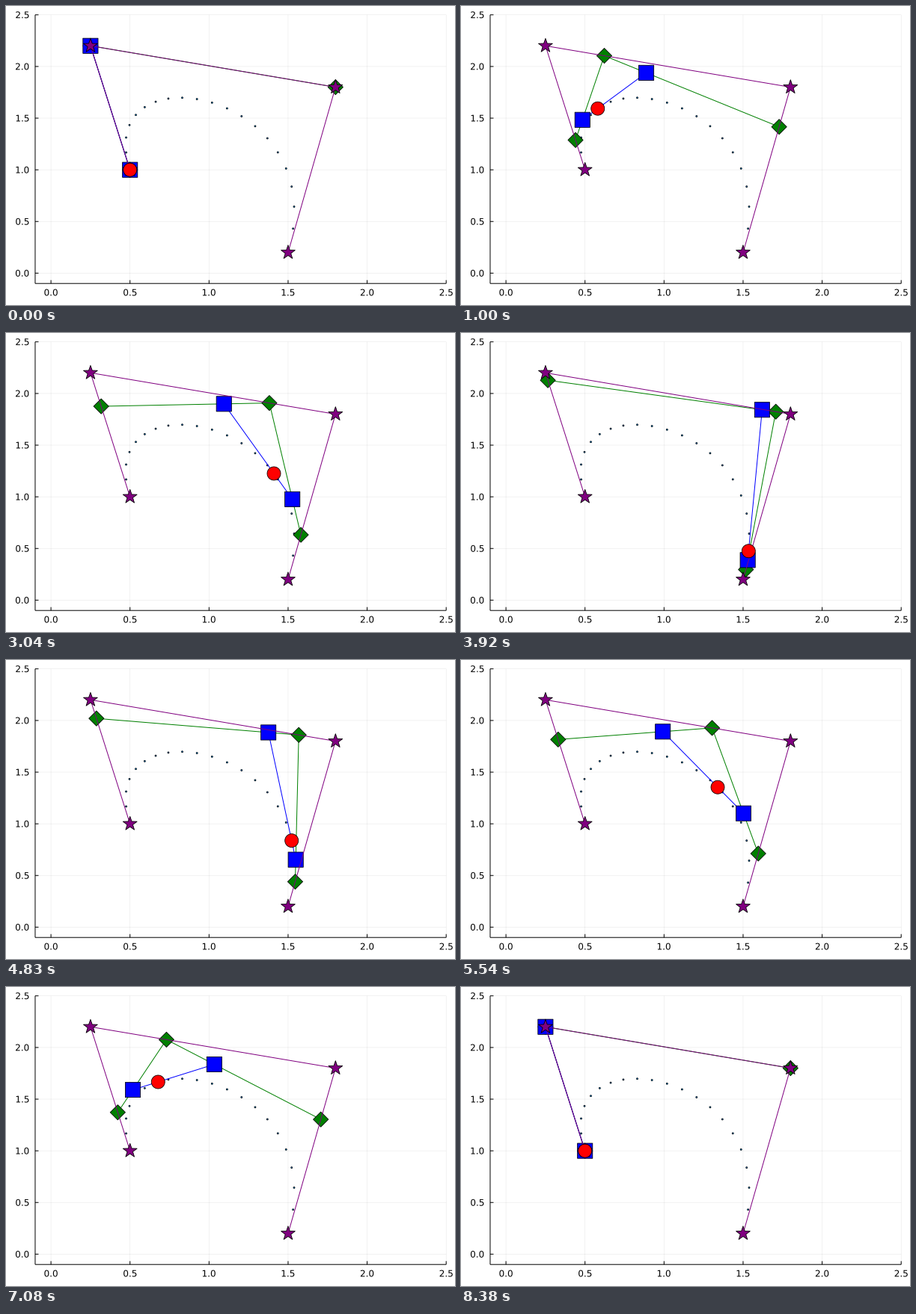
These frames come from a looping animation (600 by 400 pixels, 8.43 s). A matplotlib script:

```python
import numpy as np
import matplotlib.pyplot as plt
from matplotlib.animation import FuncAnimation
from matplotlib.patches import PathPatch
from matplotlib.textpath import TextPath
from matplotlib.transforms import Affine2D

W, H, DPI = 600, 400, 100
PX = 72 / DPI                       # points per pixel
LOOP, TICK, FPS = 8430, 15, 24
STEPS = 100                         # parameter steps in one direction
LEFT, RIGHT, TOP, BOTTOM = 38.97, 588.2, 11.8, 371.2
LO, HI = -0.1, 2.5
STROKE = 0.8 * PX                   # marker outline

CONTROL = np.array([(0.5, 1.0), (0.25, 2.2), (1.8, 1.8), (1.5, 0.2)])

plt.rcParams["font.family"] = "DejaVu Sans"


def to_px(p):
    """Data coordinates to stage pixels, y pointing down."""
    u = (np.asarray(p, float) - LO) / (HI - LO)
    return np.stack([LEFT + u[..., 0] * (RIGHT - LEFT),
                     BOTTOM - u[..., 1] * (BOTTOM - TOP)], axis=-1)


def ring(n, radius, start=-90):
    a = np.radians(start + 360 * np.arange(n) / n)
    return radius * np.c_[np.cos(a), np.sin(a)]


def star(radius):
    pts = ring(10, radius)
    pts[1::2] *= 0.4
    return pts


def lerp(pts, t):
    return (1 - t) * pts[:-1] + t * pts[1:]


def levels(t):
    """All stages of de Casteljau's construction, widest first."""
    out = [CONTROL]
    while len(out[-1]) > 1:
        out.append(lerp(out[-1], t))
    return out


fig = plt.figure(figsize=(W / DPI, H / DPI), dpi=DPI, facecolor="white")
ax = fig.add_axes([0, 0, 1, 1])
ax.set(xlim=(0, W), ylim=(H, 0))
ax.axis("off")


def label(x, y, text, align):
    """Text outline at a fractional pixel position; align 0.5 centre, 1 right."""
    path = TextPath((0, 0), text, size=12)
    box = path.get_extents()
    shift = Affine2D().scale(1, -1).translate(x - box.x0 - align * box.width, y)
    ax.add_patch(PathPatch(shift.transform_path(path), fc="black", lw=0,
                           snap=False))


def draw_axes():
    ticks = np.arange(0, 2.6, 0.5)
    xs, ys = to_px(np.c_[ticks, ticks]).T
    grid = dict(colors="black", alpha=0.1, linewidths=0.5 * PX,
                snap=False, zorder=0)
    ax.vlines(xs, TOP, BOTTOM, **grid)
    ax.hlines(ys, LEFT, RIGHT, **grid)
    ink = dict(colors="black", linewidths=PX, snap=False, zorder=1)
    ax.vlines(xs, BOTTOM - 4.5, BOTTOM, **ink)
    ax.hlines(ys, LEFT, LEFT + 4.5, **ink)
    ax.vlines(LEFT, TOP, BOTTOM, **ink)
    ax.hlines(BOTTOM, LEFT, RIGHT, **ink)
    for v, x, y in zip(ticks, xs, ys):
        label(x, 387.5, f"{v:.1f}", 0.5)
        label(30.4, y + 4.4, f"{v:.1f}", 1)


def draw_dots():
    dots = to_px([levels(t)[-1][0] for t in np.linspace(0, 1, 21)])
    for p in dots:
        ax.fill(*(p + ring(16, 1.0)).T, fc="#009afa", ec="black",
                lw=STROKE, snap=False, zorder=2)


class Layer:
    """A polyline with one outlined marker per vertex."""

    def __init__(self, count, shape, color, z):
        self.shape = shape
        self.line, = ax.plot([], [], color=color, lw=PX, zorder=z)
        self.marks = [ax.fill(*shape.T, fc=color, ec="black", lw=STROKE,
                              joinstyle="round", snap=False,
                              zorder=z + 0.5)[0] for _ in range(count)]

    def move(self, pts):
        pts = to_px(pts)
        self.line.set_data(*pts.T)
        for mark, p in zip(self.marks, pts):
            mark.set_xy(p + self.shape)


draw_axes()
draw_dots()
layers = [
    Layer(4, star(9.9), "purple", 5),
    Layer(3, ring(4, 10.1), "green", 3),
    Layer(2, ring(4, 10.1 * np.sqrt(2), 45), "blue", 4),
    Layer(1, ring(48, 9.0), "red", 6),
]


def update(k):
    # there and back at 24 steps a second, resting one extra step at each end
    step = min(int((k * TICK + 14) * FPS // 1000), 2 * STEPS + 1)
    t = min(step, 2 * STEPS + 1 - step) / STEPS
    for layer, pts in zip(layers, levels(t)):
        layer.move(pts)
    return []


update(0)
anim = FuncAnimation(fig, update, frames=LOOP // TICK, interval=TICK,
                     repeat=True, repeat_delay=0, blit=False)
plt.show()
```
